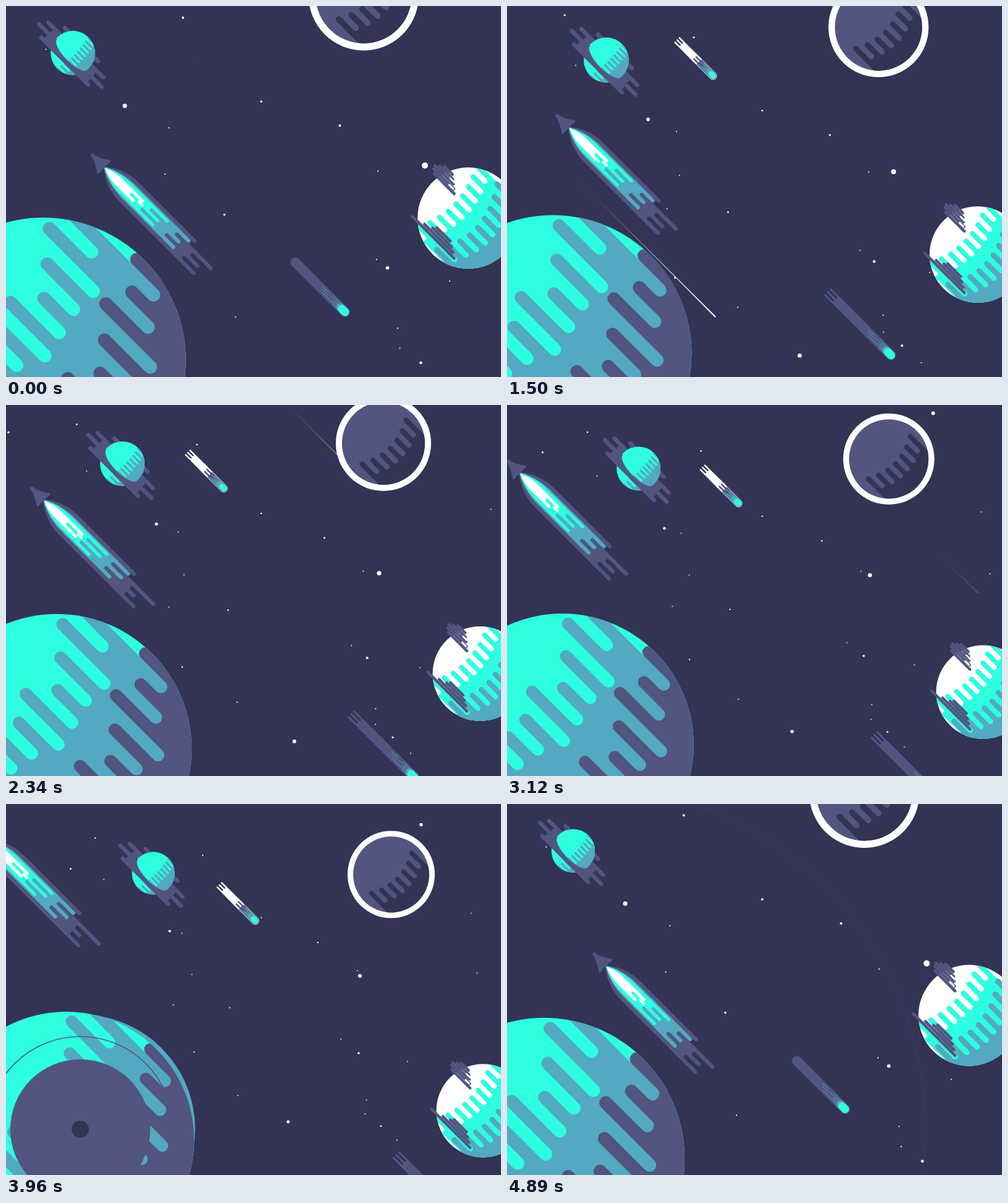
Recreate the animation shown at these times as an HTML page with a canvas. Size 800 by 600 pixels, loop 4920 ms.

```html
<!DOCTYPE html>
<html>
<head>
<meta charset="utf-8">
<title>Space drift</title>
<style>
html, body { margin: 0; width: 100%; height: 100%; overflow: hidden; background: #333354; }
canvas { display: block; }
</style>
</head>
<body>
<canvas id="stage" width="800" height="600"></canvas>
<script>
const ctx = document.getElementById('stage').getContext('2d');
const LOOP = 4.92, STEP = 0.03;
const NIGHT = '#333354', SLATE = '#515580', TEAL = '#52a9c1', AQUA = '#2effe0', WHITE = '#fff';
const BLAST = { x: 120, y: 526 }, VANISH = { x: 393, y: 285 };

// x, y at the start, x, y at 3.96 s, starting radius
const BRIGHT_STARS = [
  [677, 258, 572, 278, 5], [192, 161.5, 264.5, 205.5, 3.5], [412.5, 154.5, 412.5, 184, 1.8],
  [353, 337.5, 361.5, 329.5, 1.8], [286, 19, 318, 83, 1.9], [539.5, 193.5, 504, 224, 2],
  [616.5, 423.5, 570, 403, 2.8], [670.5, 577, 606, 521, 2.3], [43, -25, 144, 55, 2],
  [490, 616, 456, 514, 4.2], [-236, -101, 104.5, 105, 2.4], [799, -113, 671, 33.5, 4.4],
  [239, 478, 304, 401, 1.8]
];
// x, y, share of the way to the vanishing point
const FAINT_STARS = [
  [371, 503, .17], [601, 267, .16], [636.5, 553.5, .23], [717, 445, .21], [633, 521, .21],
  [599, 410, .28], [263.5, 197, .16], [257, 272, .32], [64.5, 70, .285], [860, 150, .232],
  [901, 270, .275], [247, 331, .16], [707, 610, .24]
];

const clamp = x => Math.min(1, Math.max(0, x));
const easeInOut = x => x < .5 ? 4 * x ** 3 : 1 - 4 * (1 - x) ** 3;
const grow = (s, start) => easeInOut(clamp((s - start) / .925));

// Quadratic through values at 0, 2.34 and 3.96 seconds
function track(s, a, b, c) {
  const p = (b - a) / 2.34, q = ((c - b) / 1.62 - p) / 3.96;
  return a + p * s + q * s * (s - 2.34);
}

function disc(x, y, r, color) {
  ctx.fillStyle = color;
  ctx.beginPath();
  ctx.arc(x, y, Math.max(0, r), 0, 7);
  ctx.fill();
}

function ring(r, width, color) {
  ctx.strokeStyle = color;
  ctx.lineWidth = width;
  ctx.beginPath();
  ctx.arc(BLAST.x, BLAST.y, r, 0, 7);
  ctx.stroke();
}

function clipDisc(x, y, r) {
  ctx.beginPath();
  ctx.arc(x, y, r, 0, 7);
  ctx.clip();
}

function bar(x1, x2, y, width, color) {
  ctx.strokeStyle = color;
  ctx.lineWidth = width;
  ctx.lineCap = 'round';
  ctx.beginPath();
  ctx.moveTo(x1, y);
  ctx.lineTo(x2, y);
  ctx.stroke();
}

// Alternating edge positions, bent back at both ends and leaning along its length
function teeth(count, even, odd, bend = 0, lean = 0) {
  return Array.from({ length: count }, (_, i) => {
    const u = 2 * i / (count - 1) - 1;
    return (i % 2 ? odd : even) - bend * u * u + lean * u;
  });
}

// Fills from a rounded, toothed edge to x = far; teeth alternate left and right
function comb(edge, y, pitch, far, color, leftFirst = true) {
  ctx.fillStyle = color;
  ctx.beginPath();
  ctx.moveTo(far, y - pitch / 2);
  edge.forEach((x, i) => ctx.arc(x, y + i * pitch, pitch / 2, -Math.PI / 2, Math.PI / 2, (i % 2 === 0) === leftFirst));
  ctx.lineTo(far, y + (edge.length - .5) * pitch);
  ctx.fill();
}

// Local x runs down-right, local y runs down-left
function place(x, y, scale, draw) {
  if (scale <= 0) return;
  ctx.save();
  ctx.translate(x, y);
  ctx.rotate(Math.PI / 4);
  ctx.scale(scale, scale);
  draw();
  ctx.restore();
}

function giantPlanet() {
  clipDisc(0, 0, 225);
  disc(0, 0, 226, AQUA);
  comb([-130, -67, -140, -21, -103, -23, -68, -13, -101, -3, -75, -24, -75, -31, -80], -196, 21, 300, TEAL);
  comb([-8, 50, 23, 80, 7, 127, 46, 118, 78, 130, 48, 120, 60], -217, 21, 300, SLATE);
}

function stripedPlanet() {
  ctx.save();
  clipDisc(0, 0, 82);
  disc(0, 0, 83, WHITE);
  comb(teeth(18, -30, -8, 20), -70, 8.5, 100, AQUA);
  comb(teeth(18, 22, 48, 28), -72, 9, 100, TEAL);
  ctx.restore();
  for (let i = 0; i < 5; i++) bar(-100 + 6 * Math.abs(i - 2.3), -68 + 6 * i, -32 + 5 * i, 4.8, SLATE);
  for (let i = 0; i < 4; i++) bar(-25 - 4.5 * i * i, 6 + 8 * i, 47 + 5 * i, 4.8, SLATE);
  bar(-66, -57, -25, 3, WHITE);
  bar(-60, -51, -16.5, 3, WHITE);
}

function ringedPlanet() {
  disc(0, 0, 73.5, WHITE);
  clipDisc(0, 0, 64);
  disc(0, 0, 65, SLATE);
  comb(teeth(13, 13, 33, 14), -50, 8, 90, NIGHT);
}

function bandedPlanet() {
  const sphere = () => {
    disc(0, 0, 36.5, AQUA);
    ctx.save();
    clipDisc(0, 0, 36.5);
    comb(teeth(21, 5, 18, 4), -36, 3.6, 50, TEAL);
    ctx.restore();
  };
  sphere();
  [39, 32, 64, 47, 73, 48, 55].forEach((reach, i) => bar(-reach, reach, -20 + 6.5 * i, 6.8, SLATE));
  ctx.beginPath();
  ctx.rect(-40, -40, 80, 42);
  ctx.ellipse(1, 2, 36, 13, 0, 0, Math.PI);
  ctx.clip();
  sphere();
}

function rocket(scale, s) {
  ctx.save();
  ctx.translate(28, 0);
  ctx.scale(scale, scale);
  const hull = (x, length, half, edge, pitch, color) => {
    ctx.save();
    ctx.beginPath();
    ctx.moveTo(x, 0);
    ctx.quadraticCurveTo(x + length * .4, -half, x + length, -half);
    ctx.lineTo(400, -half);
    ctx.lineTo(400, half);
    ctx.lineTo(x + length, half);
    ctx.quadraticCurveTo(x + length * .4, half, x, 0);
    ctx.clip();
    const flicker = edge.map((e, i) => e + 4 * Math.sin(s * 4 + i * 2.1));
    comb(flicker, -pitch * (edge.length - 1) / 2, pitch, -10, color, false);
    ctx.restore();
  };
  hull(0, 62, 22, [189, 174, 242, 203, 217, 200, 225], 6.3, SLATE);
  hull(1, 60, 15.5, teeth(5, 175, 154, 0, -7), 6.2, TEAL);
  hull(1, 55, 13, teeth(5, 127, 97, 0, -8), 5.2, AQUA);
  hull(3, 36, 7.5, teeth(3, 80, 60, 0, -4), 5, WHITE);
  bar(80, 88, 0, 4, WHITE);
  ctx.restore();
  ctx.fillStyle = SLATE;
  ctx.beginPath();
  ctx.moveTo(0, -2);
  ctx.bezierCurveTo(12, -4, 16, -7, 29, -15);
  ctx.bezierCurveTo(33, -13, 27, -6, 31, 0);
  ctx.bezierCurveTo(27, 6, 33, 13, 29, 15);
  ctx.bezierCurveTo(16, 7, 12, 4, 0, 2);
  ctx.fill();
}

function slateComet(s) {
  const length = Math.min(144, 115 + 67 * s);
  if (length < 144) bar(-length, 0, 0, 16, SLATE);
  else {
    comb(teeth(5, -length, -length + 16), -6.4, 3.2, 0, SLATE);
    disc(0, 0, 8, SLATE);
  }
  for (let i = 0; i < 7; i++) {
    const y = -5.4 + i * 1.8;
    bar(-30 + 8 * Math.sin(i * 2.3), -12, y, .9, TEAL);
    if (i % 2) bar(-58 + i * 2, -43 + i, y, .9, TEAL);
  }
  bar(-11, 0, 0, 13, TEAL);
  bar(-7, 0, 0, 13, AQUA);
}

function whiteComet() {
  bar(-45, 0, 0, 12.6, WHITE);
  bar(-38, 0, 0, 11.2, SLATE);
  comb(teeth(5, -82, -73), -5, 2.5, -42, WHITE);
  comb(teeth(5, -33, -45), -5, 2.5, -60, WHITE, false);
  for (let i = 0; i < 5; i++) bar(-25 - 5 * Math.sin(i * 2), -8, -4 + i * 2, 1.2, TEAL);
  bar(-10, 0, 0, 9.5, TEAL);
  bar(-4, 0, 0, 9.5, AQUA);
}

function meteor(s, at, x, y, length, strength) {
  const dt = s - at, alpha = strength * (1 - Math.abs(dt) / .3);
  if (alpha <= 0) return;
  place(x + dt * 600, y + dt * 600, 1, () => {
    const fade = ctx.createLinearGradient(-length, 0, 0, 0);
    fade.addColorStop(0, 'rgba(255,255,255,0)');
    fade.addColorStop(1, `rgba(255,255,255,${alpha})`);
    ctx.fillStyle = fade;
    ctx.beginPath();
    ctx.moveTo(-length, 0);
    ctx.lineTo(0, -1);
    ctx.lineTo(0, 1);
    ctx.fill();
  });
}

function stars(s) {
  const drift = (1 - Math.exp(-.25 * s)) / (1 - Math.exp(-.99));
  for (const [x, y, endX, endY, r] of BRIGHT_STARS)
    disc(x + (endX - x) * drift, y + (endY - y) * drift, r * (1 - .4 * drift), WHITE);
  for (const [x, y, depth] of FAINT_STARS)
    disc(x + (VANISH.x - x) * depth * drift, y + (VANISH.y - y) * depth * .85 * drift, 1.1 - .2 * drift, WHITE);
}

function scene(s, tealRadius = 0) {
  ctx.fillStyle = NIGHT;
  ctx.fillRect(0, 0, 800, 600);
  disc(BLAST.x, BLAST.y, tealRadius, TEAL);
  stars(s);
  meteor(s, 1.5, 337, 503, 327, 1);
  meteor(s, 2.2, 470, 15, 170, .8);
  meteor(s, 2.88, 617, 160, 104, .8);

  const at = (a, b, c) => track(s, a, b, c);
  place(at(108, 188, 238), at(76, 95, 112), at(1, .986, .945) * grow(s, -.76), bandedPlanet);
  place(at(578, 610, 622.5), at(-17, 62, 114), at(89, 77, 70.5) / 73.5 * grow(s, -.9), ringedPlanet);
  place(at(747, 766, 771), at(343, 434.5, 496), at(82, 76.5, 75.5) / 82 * grow(s, -.86), stripedPlanet);
  place(at(548, 660, 733), at(495, 602, 670), grow(s, -.8), () => slateComet(s));
  place(at(311.7, 352, 403), at(84, 135, 189), grow(s, -.1), whiteComet);
  place(at(60, 82, 97), at(573, 556, 543), at(236, 218, 207) / 225 * grow(s, -.76), giantPlanet);
  place(at(138, 40, -48), at(240, 133, 37), 1, () => rocket(grow(s, -.99), s));
}

function render(s) {
  // Radius of a wave that begins at start and reaches r at 4.41 s
  const wave = (start, r) => r * (Math.max(0, s - start) / (4.41 - start)) ** 2;
  scene(s, wave(3.519, 758));

  const arc = wave(3.523, 618), dark = wave(3.632, 562);
  if (arc) ring(arc, Math.max(1.5, arc * .0105), SLATE);
  if (dark) ring(dark, dark * .041, NIGHT);
  disc(BLAST.x, BLAST.y, wave(3.575, 532), SLATE);

  const portal = wave(3.853, 377);
  if (!portal) return;
  ctx.save();
  clipDisc(BLAST.x, BLAST.y, portal);
  scene(s - LOOP);
  const halo = wave(3.96, 304), ripple = wave(3.944, 135);
  if (halo) {
    ring(halo, halo * .07, SLATE);
    ring(halo * .986, 2, TEAL);
  }
  if (ripple) ring(ripple, 2, 'rgba(81,85,128,.14)');
  ctx.restore();
}

function tick() {
  const s = performance.now() / 1000 % LOOP;
  render(Math.floor(s / STEP + 1e-6) * STEP);
  requestAnimationFrame(tick);
}
tick();
</script>
</body>
</html>
```
